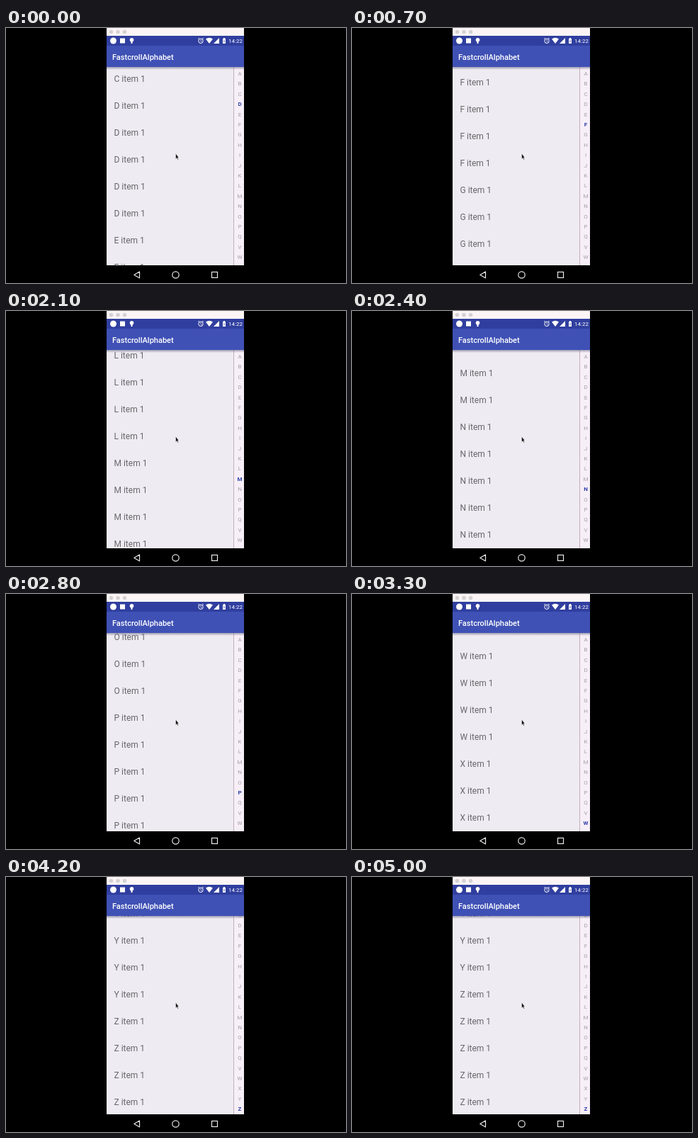
Animation, 480 px wide and 360 px high, one loop 5.1 s. Source, as an HTML page:

```html
<!DOCTYPE html>
<html lang="en">
<head>
<meta charset="utf-8">
<title>Alphabet list</title>
<style>
  html, body { margin: 0; width: 100%; height: 100%; overflow: hidden; background: #000; }
  svg { display: block; width: 480px; height: 360px; font-family: Roboto, sans-serif; }
  #list { font-size: 12px; fill: #69676b; }
  #index { font-size: 8px; fill: #a49fa8; text-anchor: middle; }
  #index .on { fill: #303fa8; font-weight: 700; }
</style>
</head>
<body>
<svg viewBox="0 0 480 360">
  <defs>
    <linearGradient id="shade" x2="0" y2="1">
      <stop stop-color="#777490" stop-opacity=".65"/>
      <stop offset="1" stop-color="#777490" stop-opacity="0"/>
    </linearGradient>
  </defs>
  <rect x="142" y="55" width="194" height="280" fill="#eeebf2"/>
  <g id="list"></g>
  <rect x="322" y="55" width="14" height="280" fill="#f7eff8"/>
  <path d="M321.5 55V335" stroke="#c3b0b5"/>
  <g id="index"></g>
  <rect x="142" y="55" width="194" height="4" fill="url(#shade)"/>

  <!-- window title, status bar, toolbar -->
  <rect x="142" width="194" height="11" fill="#fcf5f6"/>
  <g fill="#d5d2d4"><circle cx="148.5" cy="5.5" r="2.8"/><circle cx="158" cy="5.5" r="2.8"/><circle cx="167.500" cy="5.5" r="2.8"/></g>
  <rect x="142" y="11" width="194" height="14" fill="#303f9f"/>
  <rect x="142" y="25" width="194" height="30" fill="#3f51b5"/>
  <text x="150" y="44.500" font-size="11" font-weight="500" fill="#fff">FastcrollAlphabet</text>

  <g fill="#fff">
    <circle cx="151.500" cy="18" r="4.500"/>
    <rect x="161" y="14.500" width="7" height="7"/>
    <circle cx="177.500" cy="16.700" r="2.800"/>
    <path d="M176.500 18h2v4h-2zM282 15.500Q287 12 292 15.500L287 22zM301 14V22H293zM306 15h1v-1h2v1h1v7h-4z"/>
    <text x="314" y="21" font-size="8">14:22</text>
  </g>
  <path d="M307.200 18.500h1.600" stroke="#303f9f"/>
  <g fill="none" stroke="#fff">
    <circle cx="275" cy="18.300" r="3.200"/>
    <path d="M275 16.500V18.500L276.500 19.500M271 15.500L273 14M279 15.500L277 14" stroke-width=".8"/>
  </g>

  <!-- navigation bar -->
  <rect x="142" y="335" width="194" height="25"/>
  <g fill="none" stroke="#e8e8e8" stroke-width="1.200">
    <path d="M188.500 344V353L180.800 348.500Z" stroke-linejoin="round"/>
    <circle cx="239.500" cy="348.500" r="4.700"/>
    <rect x="290.500" y="344.500" width="8" height="8"/>
  </g>
  <path d="M239.500 177V185L241.200 183.500L242.300 186L243.500 185.500L242.400 183H244Z" fill="#111" stroke="#fff" stroke-width=".5"/>
</svg>
<script>
const LOOP = 5100, STEP = 100, ROW = 38, PER_LETTER = 5, INDEX_ROW = 14.4;
const letters = [...'ABCDEFGHIJKLMNOPQVWXYZ'];
const list = document.getElementById('list');
const index = document.getElementById('index');

// [time, scroll offset]
const keys = [[0, 461], [700, 912], [1400, 1598], [2100, 2066], [2800, 2676], [3700, 3728], [5000, 3825]];
const END = keys[keys.length - 1][1];
const speeds = keys.slice(1).map(([t, y], i) => (y - keys[i][1]) / (t - keys[i][0]));
const tangents = keys.map((_, i) => {
  const a = speeds[i - 1], b = speeds[i];
  if (i === 0) return b;
  return b === undefined ? 0 : 2 * a * b / (a + b);
});

function addText(parent, x, y, content) {
  const el = document.createElementNS('http://www.w3.org/2000/svg', 'text');
  el.setAttribute('x', x);
  el.setAttribute('y', y);
  el.textContent = content;
  parent.append(el);
  return el;
}

letters.forEach((letter, n) => {
  for (let k = 0; k < PER_LETTER; k++)
    addText(list, 152.5, (n * PER_LETTER + k) * ROW + 4.5, `${letter} item 1`);
});
const marks = letters.map((letter, n) => addText(index, 330, 67 + n * INDEX_ROW, letter));

// Monotone cubic through the keys
function scrollAt(t) {
  let i = 0;
  while (i < keys.length - 2 && t >= keys[i + 1][0]) i++;
  const [t0, y0] = keys[i], [t1, y1] = keys[i + 1];
  const d = t1 - t0, u = (t - t0) / d, v = 1 - u;
  return y0 * v * v * (1 + 2 * u) + y1 * u * u * (3 - 2 * u)
    + d * u * v * (tangents[i] * v - tangents[i + 1] * u);
}

function draw(t) {
  const y = scrollAt(t);
  const middle = Math.floor(Math.round((y + 201) / ROW) / PER_LETTER);
  const active = END - y < 100 ? letters.length - 1 : middle;
  const indexScroll = Math.max(0, 64 + active * INDEX_ROW - 327.2);
  list.setAttribute('transform', `translate(0 ${-y})`);
  index.setAttribute('transform', `translate(0 ${-indexScroll})`);
  marks.forEach((mark, n) => mark.classList.toggle('on', n === active));
}

const start = performance.now();
function tick() {
  const t = (performance.now() - start) % LOOP;
  draw(Math.floor(t / STEP) * STEP);
  requestAnimationFrame(tick);
}
tick();
</script>
</body>
</html>
```
